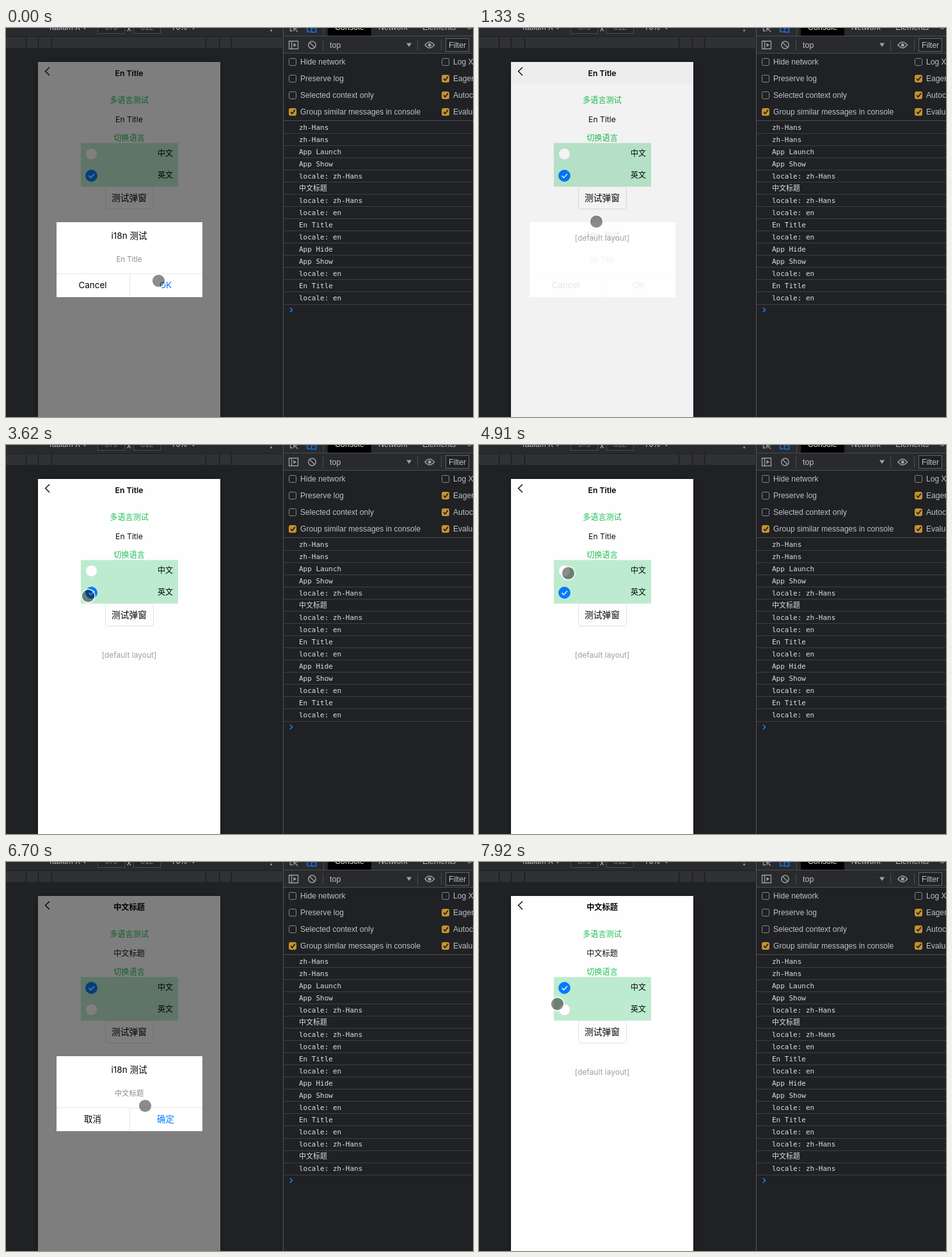
These frames come from a looping animation (730 by 607 pixels, 8000 ms). An HTML page:

```html
<!DOCTYPE html>
<html lang="zh-Hans">
<head>
<meta charset="utf-8">
<style>
html, body { margin: 0; width: 100%; height: 100%; overflow: hidden; background: #202124; }
svg { display: block; width: 730px; height: 607px; }
text { white-space: pre; }
.page { font-family: Inter, "Noto Sans CJK SC", "Noto Sans CJK", sans-serif; text-anchor: middle; }
.ui { font-family: "Liberation Sans", Arial, sans-serif; fill: #bdc1c6; }
.log { font: 11px "DejaVu Sans Mono", "Noto Sans CJK SC", "Noto Sans CJK", monospace; fill: #dcdfe3; }
</style>
</head>
<body>
<svg id="stage" viewBox="0 0 730 607"></svg>
<script>
const LOOP = 8000;
const LINE = '#494c50';
const stage = document.getElementById('stage');

const rect = (x, y, w, h, fill, more = '') =>
  `<rect x="${x}" y="${y}" width="${w}" height="${h}" fill="${fill}" ${more}/>`;
const path = (d, stroke, width = 1, more = '') =>
  `<path d="${d}" fill="none" stroke="${stroke}" stroke-width="${width}" ${more}/>`;
const label = (s, x, y, size = 12.1, more = '') =>
  `<text class="ui" x="${x}" y="${y}" font-size="${size}" ${more}>${s}</text>`;
// Centred page text; a second string is its Chinese version.
const copy = (s, x, mid, size, fill = '#000', zh = s, more = '') =>
  `<text class="page" x="${x}" y="${mid + size * .37}" font-size="${size}" fill="${fill}" data-en="${s}" data-zh="${zh}" ${more}>${s}</text>`;
const arrow = (x, y, s) => `<path d="M${x - s} ${y}h${2 * s}l${-s} ${s * 1.5}z" fill="#9aa0a6"/>`;

function deviceBar() {
  return rect(0, 0, 433, 14, '#292a2d') + rect(0, 14, 432, 17, '#303134') +
    path('M0 13.5H433', '#1d1e20') +
    [32, 51, 72, 313, 334, 353].map(x => path(`M${x - .5} 15V31`, '#1c1d1f', 1.5)).join('') +
    label('Tablum X', 66, 3, 12) + arrow(123, -2, 3) +
    [[143, 375], [199, 812]].map(([x, n]) =>
      rect(x + .5, -9.5, 42, 18, '#242528', `stroke="${LINE}"`) +
      label(n, x + 21.5, 3, 12, 'text-anchor="middle" style="fill:#74777b"')).join('') +
    label('x', 189, 5, 13) + label('70%', 259, 3, 12) + arrow(293, -2, 3) +
    [-1, 4].map(y => `<circle cx="414.5" cy="${y}" r="1.4" fill="#9aa0a6"/>`).join('');
}

function checkbox(x, y, text, on) {
  return rect(x + .5, y - 5.5, 11, 11, on ? '#c4922b' : '#202124',
      `rx="2" stroke="${on ? '#c4922b' : '#85888c'}"`) +
    (on ? path(`M${x + 3} ${y}l2.4 2.7 4.4-5.8`, '#202124', 1.8) : '') +
    label(text, x + 18, y + 4);
}

function devtools() {
  const grey = '#9aa0a6', blue = '#1a73e8';
  return rect(433, 0, 297, 40, '#292a2d') + rect(503, 0, 68, 12, '#000') +
    path('M444.5 0V4.5H448M450 0l6 6M450 5V0H456', grey, 1.3) +
    path('M471 0V6H476M477.5 0H484.5V6.5H477.5z', blue, 1.6) + path('M496.5 0V12', LINE) +
    label('Console', 514, 3, 12.5, 'style="fill:#e8eaed"') +
    label('Network', 582, 3, 12.5) + label('Elements', 651, 3, 12.5) + label('»', 721, 3, 13) +
    path('M434 12.5H730M434 39.5H730M434 144.5H730', LINE) + path('M433.5 0V607', '#54575b') +
    path('M442.5 20.5H456.5V32.5H442.5zM446.5 20V33', grey, 1.3) +
    `<path d="M449.5 23.5v6l4.500-3z" fill="${grey}"/>` +
    `<circle cx="478.500" cy="26.500" r="5.700" fill="none" stroke="${grey}" stroke-width="1.500"/>` +
    path('M474.500 22.500l8 8', grey, 1.500) +
    path('M495.5 18V35M643.5 18V35M680.5 18V35', LINE) +
    label('top', 506, 30.5, 12.500) + arrow(630, 23.500, 4) +
    path('M655 26.500Q662 17.500 669.500 26.500Q662 35.500 655 26.500z', grey, 1.600) +
    `<circle cx="662.200" cy="26.500" r="2.600" fill="${grey}"/>` +
    rect(687.5, 16.5, 36, 20, '#202124', 'stroke="#5f6368"') + label('Filter', 692, 31, 12.200) +
    checkbox(442, 53, 'Hide network') + checkbox(442, 79, 'Preserve log') +
    checkbox(442, 105, 'Selected context only') +
    checkbox(442, 131, 'Group similar messages in console', true) +
    checkbox(681, 53, 'Log XMLHttpRequests') + checkbox(681, 79, 'Eager evaluation', true) +
    checkbox(681, 105, 'Autocomplete from history', true) +
    checkbox(681, 131, 'Evaluate triggers user activation', true);
}

const logs = ['zh-Hans', 'zh-Hans', 'App Launch', 'App Show', 'locale: zh-Hans', '中文标题',
  'locale: zh-Hans', 'locale: en', 'En Title', 'locale: en', 'App Hide', 'App Show',
  'locale: en', 'En Title', 'locale: en', 'locale: zh-Hans', '中文标题', 'locale: zh-Hans'];
const logRow = (s, i) => `<g class="row"><text class="log" x="458" y="${159 + 19 * i}">${s}</text>` +
  path(`M434 ${163.5 + 19 * i + (i > 13 ? 2 : 1)}H730`, '#3c3e41') + '</g>';

const radio = (id, y) => `<g id="${id}" transform="translate(133.5 ${y})">` +
  `<circle r="9" stroke-width=".8"/>${path('M-4 0l3 3.200 5.500-6', '#fff', 1.400)}</g>`;

function phone() {
  return rect(45, 48, 295, 600, '#1d1e21', 'rx="20"') + rect(50, 53, 285, 554, '#fefefe') +
    path('M68 61.500l-6.500 6 6.500 6.500', '#000', 1.300) +
    copy('En Title', 192.5, 70, 12.200, '#000', '中文标题', 'font-weight="600"') +
    copy('多语言测试', 192.5, 113, 12.100, '#1cbf53') +
    copy('En Title', 192.5, 142, 12.200, '#111', '中文标题') +
    copy('切换语言', 192.5, 171, 12.200, '#1cbf53') +
    rect(117, 179.5, 152, 68, '#bdebd0') +
    radio('zhRadio', 196.5) + radio('enRadio', 230.5) +
    copy('中文', 249, 196, 12) + copy('英文', 249, 230, 12) +
    rect(155.5, 247.5, 75, 35, '#fefefe', 'id="button" rx="4" stroke="#e2e2e2"') +
    copy('测试弹窗', 192.5, 264.5, 13.700, '#000', undefined, 'id="buttonText"') +
    copy('[default layout]', 192.5, 327.5, 12, '#9a9fa8');
}

function modal() {
  return '<path id="mask" fill-rule="evenodd" d="M50 53H335V607H50zM79 303V420H307V303z"/>' +
    rect(50, 53, 285, 33, '#000', 'id="header"') + '<g id="modal">' +
    rect(79, 303, 228, 117, '#fff', 'rx="2.5"') +
    copy('i18n 测试', 192.5, 324.5, 13.500) +
    copy('En Title', 192.5, 360.5, 11.400, '#8c8c8c', '中文标题') +
    path('M79 383.5H307M193.5 384V420', '#e6e6e6') +
    copy('Cancel', 135.5, 401.5, 13.400, '#000', '取消') +
    copy('OK', 249.5, 401.5, 13.400, '#007aff', '确定') + '</g>';
}

stage.innerHTML = rect(0, 0, 730, 607, '#202124') + phone() + modal() + deviceBar() + devtools() +
  logs.map(logRow).join('') + path('M444 436.500l3.500 3.500-3.500 3.500', '#1a84ff', 1.600, 'id="prompt"') +
  '<g id="cursor"><circle r="10.4" fill="none" stroke="#fff" stroke-opacity=".8" stroke-width="1.6"/>' +
  '<circle id="touch" r="9.6"/></g>';

const $ = id => document.getElementById(id);
const set = (id, attrs) => Object.entries(attrs).forEach(([k, v]) => $(id).setAttribute(k, v));
const clamp = v => Math.max(0, Math.min(1, v));
const ramp = (t, start, length) => clamp((t - start) / length);

// Each move: start, end, target x, target y.
const moves = [
  [50, 210, 243.5, 400.5], [530, 800, 137.5, 400], [1190, 1330, 183.5, 302],
  [1330, 1850, 131, 195], [3050, 3330, 128.5, 235.5], [3810, 3910, 139.5, 200],
  [4150, 4500, 135, 236], [4690, 4910, 139.5, 200], [5400, 5500, 132, 197],
  [5690, 5960, 209.5, 271.5], [6280, 6700, 217.5, 380.5], [7010, 7400, 137, 401],
  [7640, 7920, 122.5, 221.5]
];

function cursorAt(t) {
  let x = 238.5, y = 394.5;
  for (const [start, end, tx, ty] of moves) {
    const p = ramp(t, start, end - start), e = p * p * (3 - 2 * p);
    x += (tx - x) * e;
    y += (ty - y) * e;
  }
  return [x, y];
}

function modalOpacity(t) {
  const out = start => (1 - ramp(t, start, 190)) ** 2;
  return t < 6130 ? out(1200) : t < 7550 ? ramp(t, 6130, 200) : out(7550);
}

function setRadio(id, on) {
  const [circle, tick] = $(id).children;
  circle.setAttribute('fill', on ? '#007aff' : '#fff');
  circle.setAttribute('stroke', on ? '#007aff' : '#d4d8d6');
  tick.setAttribute('opacity', +on);
}

function draw(t) {
  const chinese = t >= 5730, pressed = t >= 6110 && t < 6270, open = modalOpacity(t);
  const rows = t < 6130 ? 15 : 18;
  document.querySelectorAll('.page').forEach(el => {
    el.textContent = chinese ? el.dataset.zh : el.dataset.en;
  });
  setRadio('zhRadio', chinese);
  setRadio('enRadio', !chinese);
  set('button', { fill: pressed ? '#dedede' : '#fefefe', stroke: pressed ? '#c8c8c8' : '#e2e2e2' });
  set('buttonText', { opacity: pressed ? .6 : 1 });
  set('mask', { opacity: open / 2 });
  set('header', { opacity: open > 0 && open < 1 ? .02 : 0 });
  set('modal', { opacity: open });
  document.querySelectorAll('.row').forEach((el, i) => {
    el.style.display = i < rows ? '' : 'none';
  });
  set('prompt', { transform: `translate(0 ${(rows - 15) * 19})` });
  set('cursor', { transform: `translate(${cursorAt(t)})` });
  set('touch', { 'fill-opacity': pressed ? .65 : .45 });
}

const begin = performance.now();
function tick() {
  draw((performance.now() - begin) % LOOP);
  requestAnimationFrame(tick);
}
tick();
</script>
</body>
</html>
```
